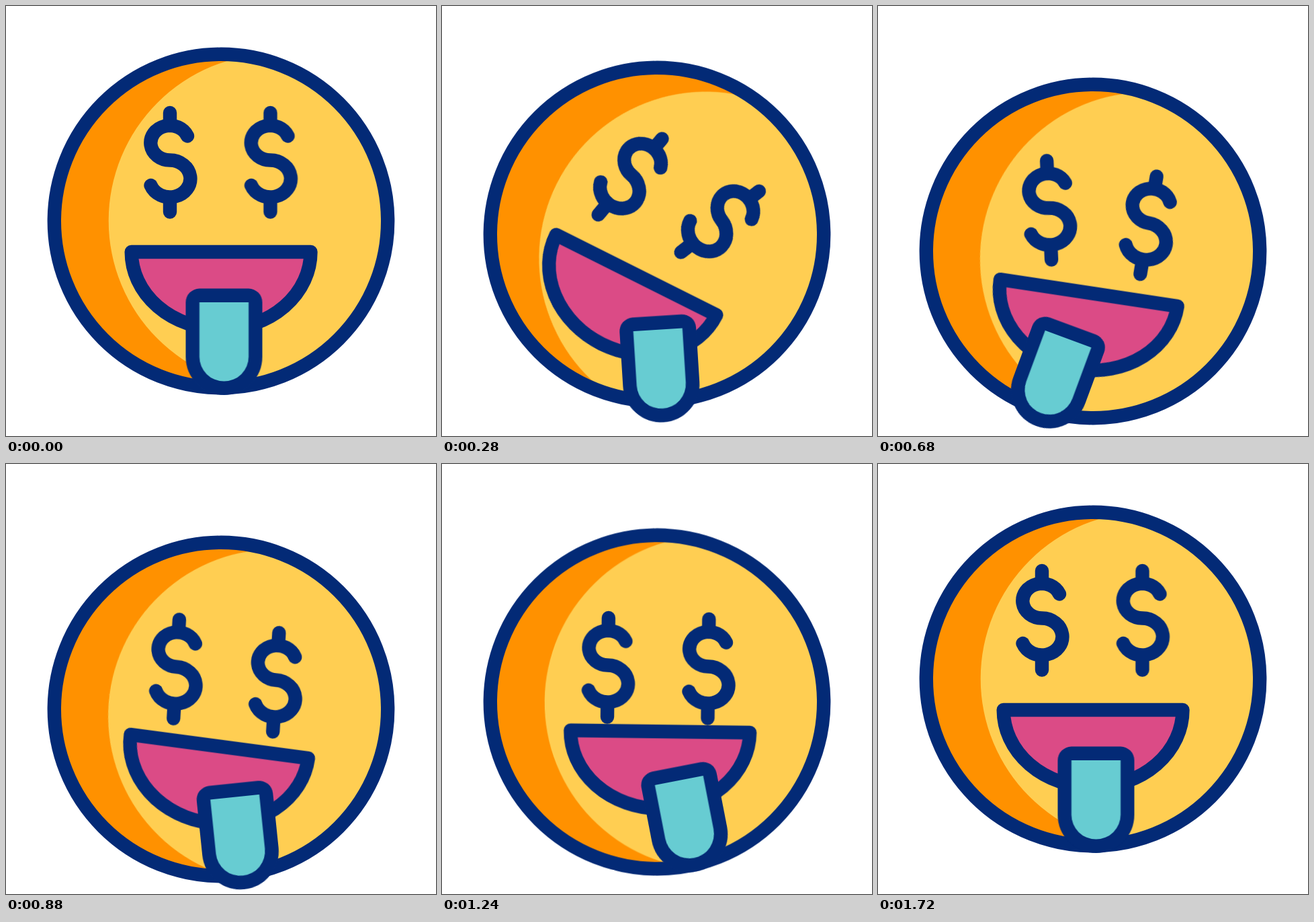
An HTML page for the animation above (2 s loop, 640 by 640 pixels).

```html
<!DOCTYPE html>
<html lang="en">
<head>
<meta charset="utf-8">
<title>Money face</title>
<style>
  html, body { margin: 0; height: 100%; overflow: hidden; background: #fff; }
  svg { display: block; width: 100vw; height: 100vh; }

  .line { stroke: #032a76; stroke-width: 20.4; stroke-linecap: round; stroke-linejoin: round; }
  .lick { stroke-width: 40.8; paint-order: stroke; }

  .bounce, .turn, .eyes, .left, .right, .jaw, .tongue {
    animation: 2s ease-in-out infinite;
  }
  .bounce { animation-name: bounce; }
  .turn   { animation-name: turn; }
  .eyes   { animation-name: eyes; }
  .left   { animation-name: left; }
  .right  { animation-name: right; }
  .jaw    { animation-name: jaw; }
  .tongue { animation-name: tongue; }

  @keyframes bounce {
    0%, 81.7%, 100% { transform: translateY(0); }
    30%, 52%        { transform: translateY(45px); }
  }
  @keyframes turn {
    0%, 86%, 100% { transform: rotate(0deg); }
    14% { transform: rotate(26.6deg); }
    24% { transform: rotate(-17.1deg); }
    34% { transform: rotate(8.6deg); }
    52% { transform: rotate(6.9deg); }
    70% { transform: rotate(-3.4deg); }
  }
  @keyframes eyes {
    0%, 82%, 100% { transform: translate(0, 0); }
    21%, 62%      { transform: translate(2.3px, 36.7px); }
  }
  @keyframes left {
    0%, 62%, 100% { transform: rotate(0deg); }
    14% { transform: rotate(13.4deg); }
    24% { transform: rotate(20.8deg); }
    34% { transform: rotate(-11.3deg); }
    52% { transform: rotate(.5deg); }
  }
  @keyframes right {
    0%, 62%, 100% { transform: rotate(0deg); }
    14% { transform: rotate(25.4deg); }
    24% { transform: rotate(1.6deg); }
    34% { transform: rotate(.9deg); }
    52% { transform: rotate(-7.3deg); }
  }
  @keyframes jaw {
    0%, 86%, 100% { transform: translate(0, 0); }
    18% { transform: translate(-.9px, 24px); }
    24% { transform: translate(.2px, 23.8px); animation-timing-function: linear; }
    34% { transform: translate(3.1px, 16.2px); animation-timing-function: linear; }
    52% { transform: translate(6.3px, 3.6px); animation-timing-function: ease-out; }
    70% { transform: translate(4.8px, -4.2px); }
  }
  @keyframes tongue {
    0%, 86%, 100% { transform: rotate(0deg); }
    14% { transform: rotate(-30.2deg); }
    24% { transform: rotate(-12deg); }
    34% { transform: rotate(11.7deg); }
    52% { transform: rotate(-30.3deg); }
    70% { transform: rotate(.7deg); }
  }
</style>
</head>
<body>
<svg viewBox="0 0 640 640">
  <defs>
    <clipPath id="disc"><circle r="248"/></clipPath>
    <path id="dollar" class="line" fill="none"
      d="M26-39.5A28.5 25.8 0 1 0 0-3.5A30.5 27.5 0 1 1-28.5 34M0-74V-55M0 52V73.5"/>
  </defs>
  <g transform="translate(320 320)">
    <g class="bounce">
      <circle r="248" fill="#ff9100"/>
      <g clip-path="url(#disc)">
        <g class="turn"><circle cx="81" cy="-.5" r="248.3" fill="#ffce52"/></g>
      </g>
      <circle class="line" r="248.2" fill="none"/>
      <g class="turn">
        <g class="eyes">
          <g transform="translate(-76 -87)"><g class="left"><use href="#dollar"/></g></g>
          <g transform="translate(73.5 -87)"><g class="right"><use href="#dollar"/></g></g>
        </g>
        <g class="jaw">
          <path class="line" fill="#db4b86" d="M-133.3 46H133.5A133.4 115 0 0 1-133.3 46Z"/>
          <g transform="translate(4.5 0)">
            <g class="tongue">
              <path class="line lick" fill="#67ccd2" d="M-36.6 121H36.6V202A36.6 36.6 0 0 1-36.6 202Z"/>
            </g>
          </g>
        </g>
      </g>
    </g>
  </g>
</svg>
</body>
</html>
```
